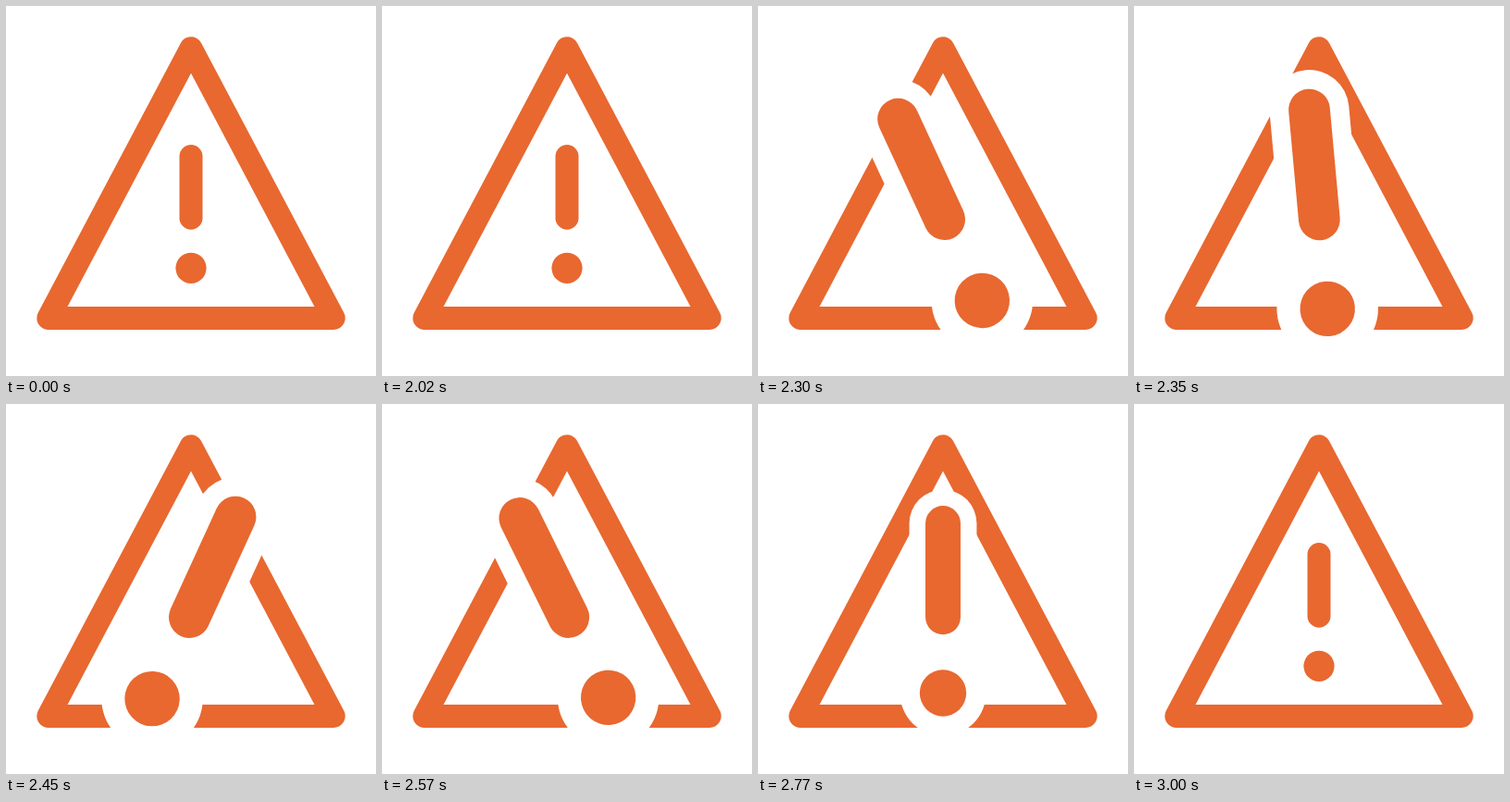
An HTML page that plays this animation: 400 px wide and 400 px high, repeating every 3.02 s.

```html
<!DOCTYPE html>
<html lang="en">
<head>
<meta charset="utf-8">
<title>Warning sign</title>
<style>
  html, body { margin: 0; width: 100%; height: 100%; overflow: hidden; background: #fff; }
  svg { display: block; width: 100vw; height: 100vh; }
  .line { fill: none; stroke: #e86830; stroke-width: 25; stroke-linecap: round; stroke-linejoin: round; }
  .dot { fill: #e86830; }
  .gap { fill: #fff; stroke: none; }
  .gap-line { stroke: #fff; stroke-width: 48; stroke-linecap: round; }
</style>
</head>
<body>
<svg viewBox="0 0 400 400">
  <path class="line" d="M200 45.8 L354.2 337.4 H45.8 Z"/>
  <g id="mark">
    <path class="gap-line" d="M200 162.5 V229.2"/>
    <circle class="gap" cx="200" cy="283.3" r="30.6"/>
    <path class="line" d="M200 162.5 V229.2"/>
    <circle class="dot" cx="200" cy="283.3" r="16.6"/>
  </g>
</svg>
<script>
  const LOOP = 3020, START = 2020;
  const PIVOT = { x: 200, y: 227 };

  // [time in ms, value]
  const SCALE = [[2020, 1], [2220, 1.79], [2620, 1.79], [3000, 1]];
  const ANGLE = [[2199, 0], [2280, -26.3], [2430, 26.3], [2570, -26.3], [2715, 0]];

  const mark = document.getElementById('mark');
  const ease = p => p * p * (3 - 2 * p);

  function valueAt(keys, t) {
    if (t <= keys[0][0]) return keys[0][1];
    for (let i = 1; i < keys.length; i++) {
      const [t0, a] = keys[i - 1], [t1, b] = keys[i];
      if (t < t1) return a + (b - a) * ease((t - t0) / (t1 - t0));
    }
    return keys[keys.length - 1][1];
  }

  // 40 poses per second, shown for 30 and 20 ms in turn
  function poseTime(t) {
    const d = t - START;
    if (d < 0) return 0;
    return START + 50 * Math.floor(d / 50) + (d % 50 >= 30 ? 25 : 0);
  }

  function draw(now) {
    const t = poseTime(now % LOOP);
    const { x, y } = PIVOT;
    mark.setAttribute('transform',
      `translate(${x} ${y}) rotate(${valueAt(ANGLE, t)}) scale(${valueAt(SCALE, t)}) translate(${-x} ${-y})`);
  }

  const begin = performance.now();
  function tick() {
    draw(performance.now() - begin);
    requestAnimationFrame(tick);
  }
  tick();
</script>
</body>
</html>
```
